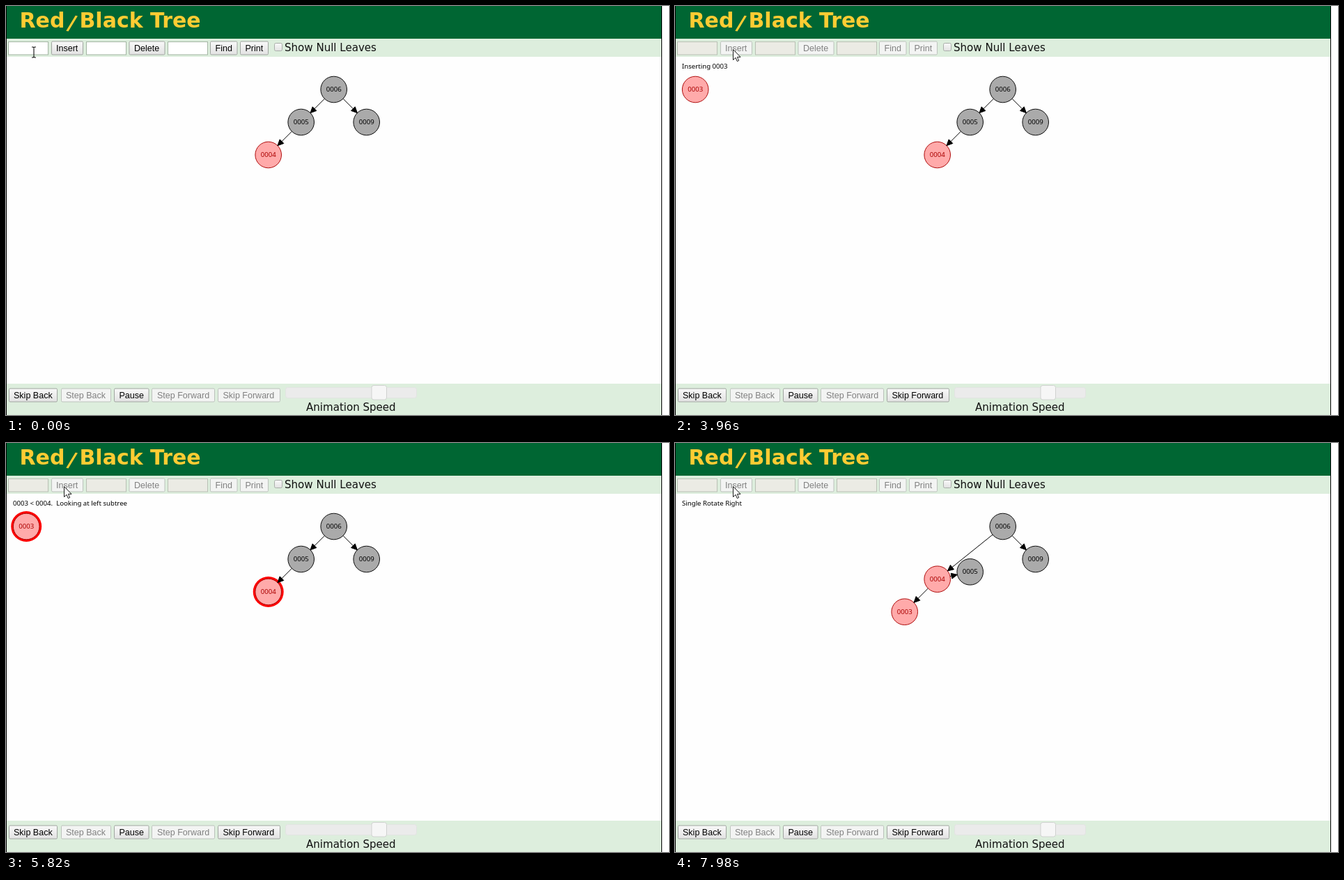
An HTML page for the animation above (8 s loop, 952x588 px).

```html
<!DOCTYPE html>
<html lang="en">
<head>
<meta charset="utf-8">
<title>Red/Black Tree</title>
<style>
  html, body { margin: 0; width: 100%; height: 100%; overflow: hidden; background: #fff; }
  svg { display: block; }
  text { white-space: pre; }
  .title { font: bold 30px "DejaVu Sans", sans-serif; fill: #fc3; }
  .label { font: 15.05px "DejaVu Sans", sans-serif; fill: #111; }
  .ui { font: 12.53px "Liberation Sans", Arial, sans-serif; }
  .small { font: 9.65px "Noto Sans", "Open Sans", sans-serif; }
</style>
</head>
<body>
<svg width="952" height="588" viewBox="0 0 952 588">
  <defs>
    <linearGradient id="face" x2="0" y2="1">
      <stop offset="0" stop-color="#f9f9f9"/><stop offset="1" stop-color="#e2e2e2"/>
    </linearGradient>
  </defs>
  <rect x="1" width="940" height="588" fill="#fefefe"/>
  <rect x="1" width="940" height="47" fill="#063"/>
  <path d="M1 47H941V73H1ZM1 543H941V588H1Z" fill="#ded"/>
  <path d="M.5 0V588M941.5 0V588" stroke="#000"/>
  <g class="title">
    <text x="19.5" y="31">Red</text>
    <text transform="translate(87 33) rotate(14)">/</text>
    <text x="105.5" y="31">Black</text>
    <text x="207" y="31">Tree</text>
  </g>
  <rect x="385.5" y="53.5" width="11" height="11" rx="2" fill="url(#face)" stroke="#a9aea9"/>
  <text class="label" x="400" y="65">Show Null Leaves</text>
  <rect x="401.5" y="548.5" width="188" height="15" rx="3" fill="#ebebeb" stroke="#e2e4e2"/>
  <rect x="525" y="545.5" width="21.5" height="20.5" rx="3" fill="#f6f6f6" stroke="#d0d2d0"/>
  <text class="label" x="431" y="582">Animation Speed</text>
  <g id="live"></g>
</svg>
<script>
const LOOP = 8000, SCALE = 0.94, R = 20 * SCALE;
const live = document.getElementById('live');

// Evenly spaced moments at which the picture is refreshed
const run = (from, to, n) =>
  Array.from({ length: n }, (_, i) => from + Math.ceil((to - from) * i / (n - 1) / 10) * 10);

const ticks = [
  0, 900, ...run(1430, 1610, 3), 1890, 2450,
  ...run(2820, 3270, 6), 3350, 3440, 3590, 3680, 3960,
  ...run(4120, 4870, 10), ...run(4960, 5290, 5), ...run(5380, 5730, 5),
  ...run(5820, 6310, 7), 6400, 6490, 7040, ...run(7390, 7980, 8)
];

const pointer = [
  [0, 40, 66.5], [1430, 40, 64], [1520, 41, 60], [1610, 41, 58.5],
  [2910, 42, 57.5], [3000, 46, 56], [3090, 55, 55.5],
  [3180, 73, 54], [3270, 89, 57], [3350, 86, 59], [3440, 84, 60], [3960, 83, 62]
];

const looking = n => `0003 < ${n}.  Looking at left subtree`;
const messages = [
  [0, ''], [3680, 'Inserting 0003'], [4120, looking('0006')], [4960, looking('0005')],
  [5730, looking('0004')], [6150, 'Found null tree (or phantom leaf), inserting element'],
  [7040, 'Node and parent are both red.  Node is left child, parent is left child\n' +
         'Can fix extra redness with a single rotation'],
  [7390, 'Single Rotate Right']
];

// Node lit between two times
const lit = [['0006', 4120, 4500], ['0005', 4960, 5330], ['0004', 5730, 6150]];
// Ring travelling from one node to the next
const hops = [['0006', '0005', 4500, 4870], ['0005', '0004', 5330, 5720]];

const current = (rows, t) => rows.filter(r => r[0] <= t).pop();
const between = (t, a, b) => t >= a && t < b;
const progress = (t, a, b) => Math.min(1, Math.max(0, (t - a) / (b - a)));
const mix = (a, b, k) => a + (b - a) * k;
const mixPoint = (a, b, k) => [mix(a[0], b[0], k), mix(a[1], b[1], k)];

// Triangle wave, 3 to 7 units
const pulse = t => {
  const p = ((t - 4060) % 1680 + 1680) % 1680;
  return (3 + Math.min(p, 1680 - p) / 210) * SCALE;
};

function positions(t) {
  const turn = 47 * progress(t, 7840, 8200);
  const [x, y] = mixPoint([29.2, 120], [329.7, 261], progress(t, 6153, 6490));
  return {
    '0006': [470.7, 120],
    '0009': [517.7, 167],
    '0005': [423.7, 167 + turn],
    '0004': [376.7, 214 - turn],
    '0003': [x, y - turn]
  };
}

function button(label, x, w, tx, y, off, hover, down) {
  const border = hover ? '#707070' : off ? '#bcc2bc' : '#a0a5a0';
  return `<rect x="${x}" y="${y}" width="${w}" height="19" rx="1.5"
    fill="${down ? '#dcdcdc' : off ? '#f3f4f3' : 'url(#face)'}" stroke="${border}"/>
    <text class="ui" x="${tx}" y="${y + 14}" fill="${off ? '#808080' : '#000'}">${label}</text>`;
}

function field(x, off, focus) {
  const box = `x="${x}" y="51.5" width="57" height="18.5"`;
  return `<rect ${box} fill="${off ? '#ebebe4' : '#fff'}" stroke="${off ? '#b9c0b4' : '#a3b5a3'}"/>` +
    (focus ? `<rect ${box} rx="1" fill="none" stroke="#6a9fe0" stroke-width="1.8"/>` : '');
}

function controls(t) {
  const off = t >= 3680, focus = between(t, 900, 3590);
  let s = field(3.5, off, focus) + field(115.5, off) + field(232.5, off);
  if (between(t, 900, 1430) || between(t, 1890, 2450)) s += '<path d="M6.5 54V68" stroke="#000"/>';
  if (between(t, 2820, 3680)) s += '<text class="ui" x="6" y="65">3</text>';
  s += button('Insert', 65.5, 45, 72, 51, off, between(t, 3180, 3680), between(t, 3590, 3680));
  s += button('Delete', 177, 51, 184, 51, off);
  s += button('Find', 293.5, 38.5, 300.5, 51, off);
  s += button('Print', 336.5, 40, 343.5, 51, off);
  s += button('Skip Back', 4.5, 69, 11, 550);
  s += button('Step Back', 79.5, 71, 86, 550, true);
  s += button('Pause', 155.5, 49.5, 162.5, 550);
  s += button('Step Forward', 209.5, 90, 217, 550, true);
  s += button('Skip Forward', 304.5, 89, 311.5, 550, !off);
  return s;
}

function node(name, [x, y], ring) {
  const red = name === '0003' || name === '0004', ink = red ? '#a00' : '#000';
  return (ring ? `<circle cx="${x}" cy="${y}" r="${R + ring}" fill="#f00"/>` : '') +
    `<circle cx="${x}" cy="${y}" r="${R}" fill="${red ? '#faa' : '#aaa'}" stroke="${ink}" stroke-width=".95"/>
    <text class="small" x="${x}" y="${y + 3}" text-anchor="middle" fill="${ink}">${name}</text>`;
}

function arrow(a, b, color, width) {
  const len = Math.hypot(b[0] - a[0], b[1] - a[1]);
  const u = (b[0] - a[0]) / len, v = (b[1] - a[1]) / len;
  const x = b[0] - u * R, y = b[1] - v * R;
  const bx = x - u * 8.5, by = y - v * 8.5;
  return `<path d="M${a[0] + u * R} ${a[1] + v * R}L${x} ${y}L${bx - v * 4} ${by + u * 4}
    L${bx + v * 4} ${by - u * 4}L${x} ${y}" fill="${color}" stroke="${color}" stroke-width="${width}"/>`;
}

function tree(t) {
  const at = positions(t), turned = t >= 7840;
  const glow = lit.find(l => between(t, l[1], l[2]));
  const names = ['0006', '0009', '0005', '0004'];
  if (t >= 3680) names.push('0003');
  let s = names.map(n => node(n, at[n], glow && (n === glow[0] || n === '0003') ? pulse(t) : 0)).join('');

  const edges = turned
    ? [['0006', '0009'], ['0006', '0004'], ['0004', '0005']]
    : [['0006', '0009'], ['0006', '0005'], ['0005', '0004']];
  if (t >= 6150) edges.push(['0004', '0003']);
  if (between(t, 7390, 7840)) s += arrow(at['0005'], at['0004'], '#f00', pulse(t));
  s += edges.map(([a, b]) => arrow(at[a], at[b], '#000', 1)).join('');

  for (const [a, b, t0, t1] of hops) {
    if (!between(t, t0, t1 + 10)) continue;
    const [x, y] = mixPoint(at[a], at[b], progress(t, t0, t1));
    s += `<circle cx="${x}" cy="${y}" r="${R}" fill="none" stroke="#070" stroke-width="3.76"/>`;
  }
  return s;
}

function message(t) {
  return current(messages, t)[1].split('\n').map((line, i) =>
    `<text class="small" x="10" y="${90 + i * 11.3}">${line.replace('<', '&lt;')}</text>`).join('');
}

function cursor(t) {
  const [start, x, y] = current(pointer, t);
  const shape = start < 3180
    ? '<path d="M-3 -7.5H-1L0 -6.5L1 -7.5H3M0 -6.5V6.5M-3 7.5H-1L0 6.5L1 7.5H3" fill="none" stroke="#111" stroke-width="1.1"/>'
    : '<path d="M.5 .5V15.5L4 12.3L6.3 17.5L8.6 16.5L6.4 11.4H11Z" fill="#fff" stroke="#111" stroke-width=".95"/>';
  return `<g transform="translate(${x} ${y})">${shape}</g>`;
}

let shown = -1;
function frame(now) {
  const time = now % LOOP;
  const t = ticks.filter(k => k <= time).pop();
  if (t !== shown) {
    shown = t;
    live.innerHTML = controls(t) + message(t) + tree(t) + cursor(t);
  }
  requestAnimationFrame(frame);
}
frame(0);
</script>
</body>
</html>
```
